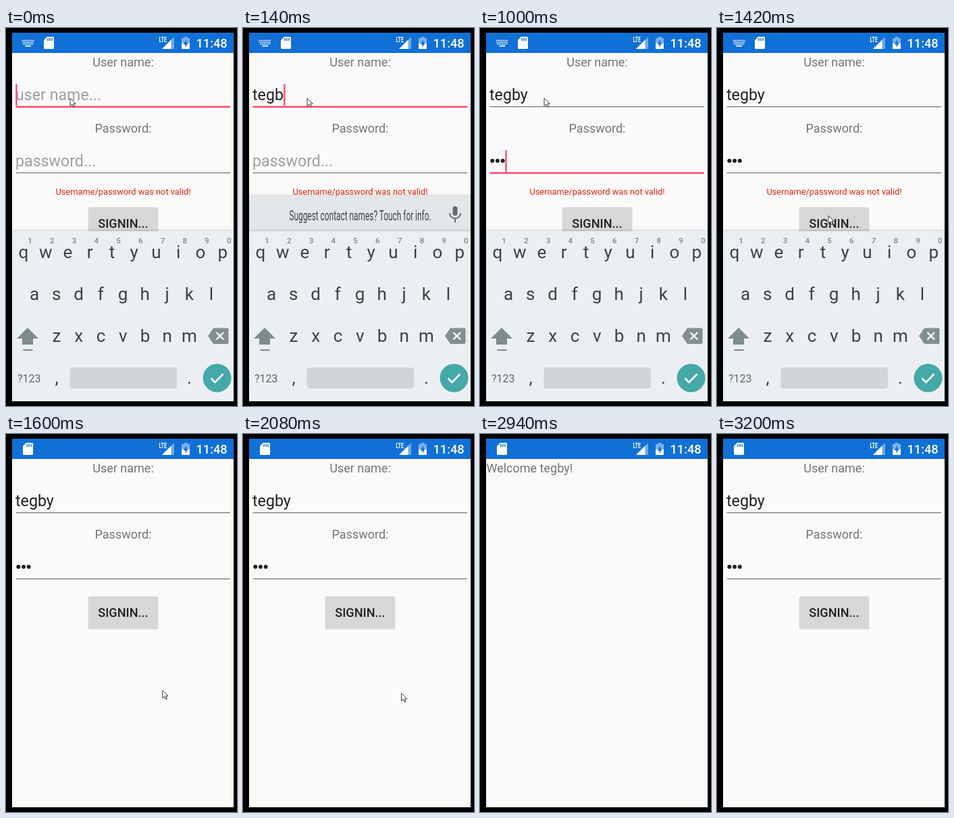
An HTML page for the animation above (3.48 s loop, 342 by 560 pixels).

```html
<!DOCTYPE html>
<html lang="en">
<head>
<meta charset="utf-8">
<title>Sign-in demo</title>
<style>
  html, body { margin: 0; width: 100%; height: 100%; overflow: hidden; background: #000; }
  svg { display: block; width: 100%; height: 100%; font-family: Roboto, sans-serif; }
  .mid, #keys text { text-anchor: middle; }
  .label { font-size: 18px; fill: #757575; }
  .input { font-size: 23.2px; fill: #212121; }
  .hint { fill: #a0a0a0; }
  .medium { font-weight: 500; }
  .accent { fill: #ff4d70; }
  .key { font-size: 26px; fill: #37434a; }
  .digit { font-size: 11.5px; font-weight: 500; fill: #7b868b; }
  .word { font-size: 22px; fill: #5b676d; }
  .off { visibility: hidden; }
</style>
</head>
<body>
<svg viewBox="0 0 342 560">
  <defs>
    <clipPath id="screen"><rect x="9" y="7" width="328" height="546"/></clipPath>
    <linearGradient id="shade" x2="0" y2="1">
      <stop offset="0" stop-opacity="0"/>
      <stop offset="1" stop-opacity=".12"/>
    </linearGradient>
  </defs>
  <rect width="342" height="560"/>

  <g clip-path="url(#screen)">
    <rect x="9" y="7" width="328" height="546" fill="#fafafa"/>

    <g id="login">
      <text class="label mid" x="173.5" y="57">User name:</text>
      <text class="input hint" id="nameHint" x="14" y="107">user name...</text>
      <text class="input" id="name" x="14" y="107"></text>
      <rect id="nameLine" x="14.5" width="317.5"/>
      <text class="label mid" x="173.5" y="155">Password:</text>
      <text class="input hint" id="passHint" x="14" y="205">password...</text>
      <g id="dots" fill="#212121">
        <circle cx="18.3" cy="196.7" r="3"/>
        <circle cx="26" cy="196.7" r="3"/>
        <circle cx="33.7" cy="196.7" r="3"/>
      </g>
      <rect id="passLine" x="14.5" width="317.5"/>
      <rect class="accent" id="caret" width="2.4" height="32"/>
      <text class="mid" id="error" x="173.5" y="247" font-size="12.8" fill="#dc2410">Username/password was not valid!</text>
      <g id="button">
        <rect x="121.5" y="241.5" width="104" height="48" rx="3" opacity=".12"/>
        <rect x="122" y="240.5" width="103" height="47.5" rx="2.5" fill="#d6d7d7"/>
        <text class="mid medium" x="173.5" y="271" font-size="18.1" fill="#212121">SIGNIN...</text>
      </g>
    </g>

    <g id="welcome">
      <rect x="9" y="37" width="328" height="560" fill="#fafafa"/>
      <text class="label" id="greeting" x="9.5" y="57"></text>
    </g>

    <g id="strip">
      <rect x="9" y="245" width="328" height="4" fill="url(#shade)"/>
      <rect x="9" y="249" width="328" height="52" fill="#e4e7e9"/>
      <text class="mid" id="notice" transform="translate(173.5 285) scale(.566 1)" font-size="21" fill="#37434a">Suggest contact names? Touch for info.</text>
      <g id="words">
        <text class="word mid" x="93" y="285">Tegby</text>
        <text class="word mid" x="173" y="285" font-weight="700" style="fill:#37434a">tegby</text>
        <text class="word mid" x="254" y="285">Wegby</text>
        <path d="M130.5 262v30M215.5 262v30" stroke="#cdd2d5"/>
        <path d="M166 297.2h0M172.5 297.2h0M179 297.2h0" stroke="#37434a" stroke-width="4" stroke-linecap="round"/>
      </g>
      <g fill="none" stroke="#606c72" stroke-width="2">
        <rect x="310.5" y="264" width="7" height="14" rx="3.5" fill="#606c72" stroke="none"/>
        <path d="M306 274.5a8 7.6 0 0 0 16 0M314 282v6"/>
      </g>
    </g>

    <g id="keyboard">
      <rect x="9" y="297" width="328" height="4" fill="url(#shade)"/>
      <rect x="9" y="301" width="328" height="252" fill="#eceff1"/>
      <g id="keys"></g>
      <path d="M32 444 48 460H40V469H24V460H16Z" fill="#7f8a8f"/>
      <rect x="25.5" y="476" width="14" height="2.2" fill="#7f8a8f"/>
      <path d="M299 456.3 307 444.5H327.500q2 0 2 2V466q0 2-2 2H307Z" fill="#838e93"/>
      <path d="M311.500 451 322 461.500M322 451 311.500 461.500" stroke="#fff" stroke-width="2.4"/>
      <text x="17" y="524.500" font-size="16" fill="#5b676d">?123</text>
      <rect x="94.500" y="503" width="158.500" height="31" rx="4" fill="#d0d5d8"/>
      <circle cx="312.500" cy="518.500" r="21" fill="#45a8a9"/>
      <path d="M303.500 519 309.500 525 321.500 512.500" fill="none" stroke="#fff" stroke-width="2.6"/>
    </g>

    <rect x="9" y="7" width="328" height="30" fill="#1070d5"/>
    <g fill="#fff">
      <g id="imeIcon" stroke="#fff" stroke-width="1.7" stroke-dasharray="1.7 .9">
        <path d="M23.500 18.500H42M24.500 21.300H41M25.500 24H40"/>
        <path d="M28.500 26.700H37" stroke-dasharray="none"/>
      </g>
      <g id="card">
        <path d="M30 13H38.500q1.500 0 1.500 1.500V29.500q0 1.500-1.500 1.500H26.500q-1.500 0-1.500-1.500V18Z"/>
        <path d="M31 15v4M34 15v4M37 15v4" stroke="#1070d5" stroke-width="1.500"/>
      </g>
      <path d="M249 13V31H231Z" opacity=".4"/>
      <path d="M244.500 17.500V31H231Z"/>
      <text transform="translate(226.500 20.500) scale(.64 1)" font-size="11" font-weight="700">LTE</text>
      <path d="M260 15H263.500V13H268.500V15H272V23H260Z" opacity=".45"/>
      <path d="M260 22.500H272V31H260Z"/>
      <path d="M267 17 262.500 24.300H265.500V29L269.700 21.800H267Z" fill="#1070d5"/>
      <text class="medium" x="281.500" y="29" font-size="18.200">11:48</text>
    </g>
  </g>

  <path id="pointer" d="M0 0V11.500L2.700 9 4.600 13.300 6.600 12.400 4.700 8.300H8.300Z" fill="#fff" stroke="#222" stroke-width=".9"/>
</svg>

<script>
const LOOP = 3480, USER = 'tegby';
const TYPED = [40, 60, 100, 140, 200];
const DOTS = [860, 920, 980];
const FOCUS_PASS = 720, BLUR = 1140, HIDE_KEYS = 1460, ACCEPTED = 1560;
// time, x, y of the arrow tip
const PATH = [
  [0, 95, 104], [1040, 95, 104], [1400, 165, 278], [1460, 165, 278],
  [1620, 234.5, 384], [2459, 234.5, 384], [2460, 233.5, 366.5], [2680, 345, 300]
];

const $ = id => document.getElementById(id);
const show = (el, on) => el.classList.toggle('off', !on);
const ramp = (t, a, b) => Math.min(1, Math.max(0, (t - a) / (b - a)));
const smooth = p => p * p * (3 - 2 * p);
const count = (t, times) => times.filter(x => t >= x).length;
const within = (t, a, b) => t >= a && t < b;
const shift = (el, x, y) => el.setAttribute('transform', `translate(${x} ${y})`);
const set = (el, attrs) => {
  for (const k in attrs) el.setAttribute(k, attrs[k]);
};

function addKey(char, x, y, cls) {
  const el = document.createElementNS('http://www.w3.org/2000/svg', 'text');
  set(el, { x, y, class: cls });
  el.textContent = char;
  $('keys').append(el);
}

function addRow(chars, x, y, cls = 'key') {
  [...chars].forEach((c, i) => addKey(c, x + i * 32.75, y, cls));
}

addRow('qwertyuiop', 26, 341);
addRow('1234567890', 35.5, 318.5, 'digit');
addRow('asdfghjkl', 42, 403);
addRow('zxcvbnm', 75, 465);
addKey(',', 75, 527, 'key');
addKey('.', 271.5, 527, 'key');
$('greeting').textContent = `Welcome ${USER}!`;

function underline(el, y, focused) {
  set(el, {
    y: focused ? y - 0.5 : y,
    height: focused ? 2.6 : 1.2,
    fill: focused ? '#ff4d70' : '#727272'
  });
}

function drawForm(t) {
  const name = $('name'), typed = USER.slice(0, count(t, TYPED));
  const dots = count(t, DOTS), onName = t < FOCUS_PASS;
  if (name.textContent !== typed) name.textContent = typed;
  show($('nameHint'), !typed);
  show($('passHint'), !dots);
  [...$('dots').children].forEach((dot, i) => show(dot, i < dots));

  underline($('nameLine'), 116, onName);
  underline($('passLine'), 214, within(t, FOCUS_PASS, BLUR));

  const textWidth = onName
    ? (typed ? name.getComputedTextLength() : 0)
    : dots * 7.7;
  set($('caret'), { x: 14.2 + textWidth, y: onName ? 83 : 181 });
  show($('caret'), t < 460 || within(t, 600, BLUR));

  show($('error'), t < ACCEPTED);
  shift($('button'), 0, t < ACCEPTED ? 25 : 0);
}

function drawKeyboard(t) {
  const out = ramp(t, HIDE_KEYS, 1580);
  shift($('keyboard'), 0, 70 * out * out);
  $('keyboard').style.opacity = 1 - out;
  $('strip').style.opacity = ramp(t, 40, 100) - ramp(t, 760, 840);
  show($('notice'), t < 220);
  show($('words'), t >= 220);
  show($('imeIcon'), t < ACCEPTED);
  shift($('card'), t < ACCEPTED ? 31 : 0, 0);
}

function drawWelcome(t) {
  const p = smooth(ramp(t, 2080, 2240)) - smooth(ramp(t, 2940, 3200));
  $('welcome').style.opacity = p;
  shift($('welcome'), 0, 40 * (1 - p));
}

function drawPointer(t) {
  const next = PATH.findIndex(p => p[0] > t);
  show($('pointer'), next > 0);
  if (next < 1) return;
  const [t0, x0, y0] = PATH[next - 1], [t1, x1, y1] = PATH[next];
  const p = smooth(ramp(t, t0, t1));
  shift($('pointer'), x0 + (x1 - x0) * p, y0 + (y1 - y0) * p);
}

function draw(t) {
  drawForm(t);
  drawKeyboard(t);
  drawWelcome(t);
  drawPointer(t);
}

const start = performance.now();
function tick(now) {
  draw(Math.max(0, now - start) % LOOP);
  requestAnimationFrame(tick);
}
draw(0);
requestAnimationFrame(tick);
</script>
</body>
</html>
```
